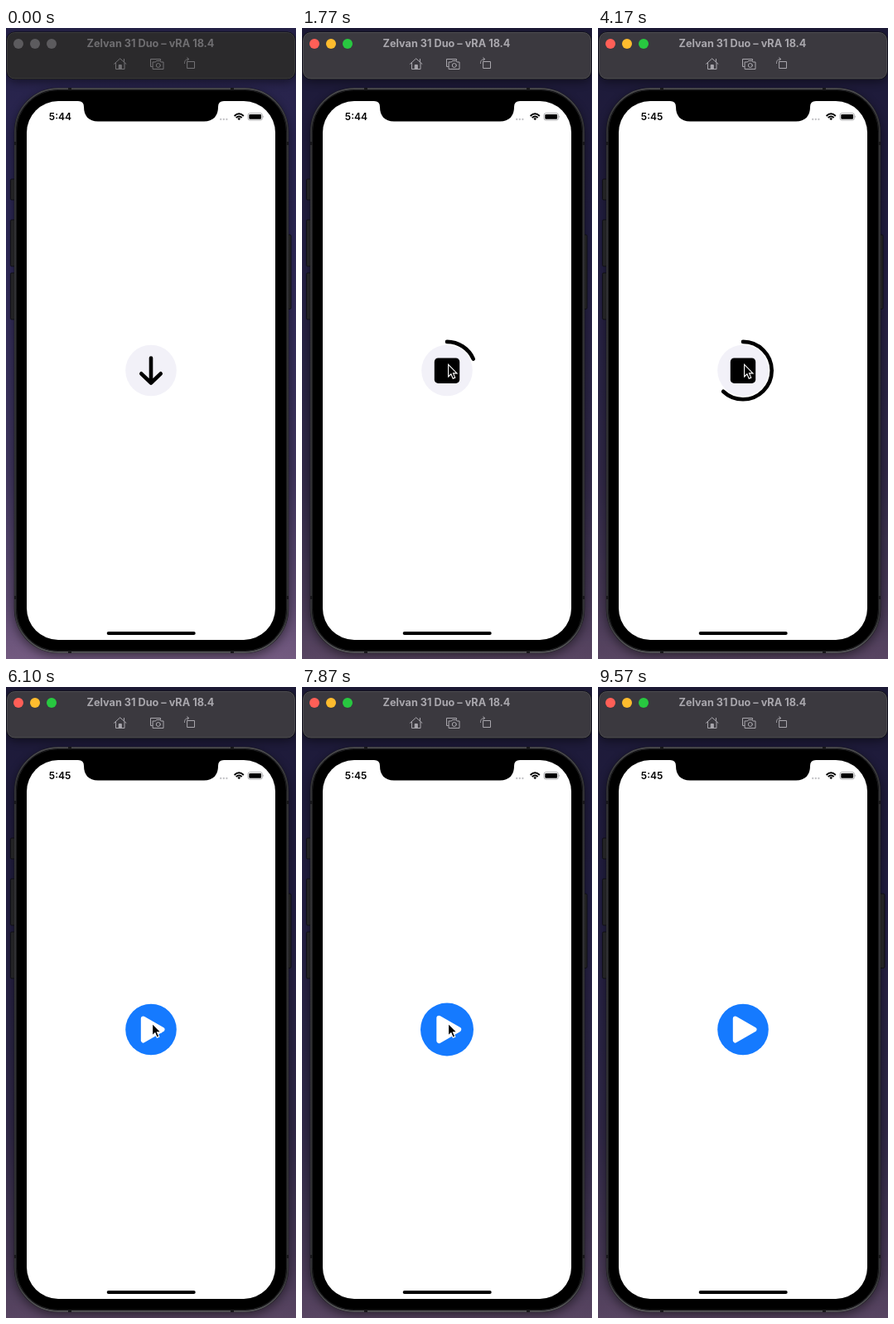
Animation, 350 px wide and 760 px high, one loop 9630 ms. Source, as an HTML page:

```html
<!DOCTYPE html>
<html lang="en">
<head>
<meta charset="utf-8">
<title>Download button</title>
<style>
  html, body { margin: 0; height: 100%; overflow: hidden; background: #2b2650; }
  svg { display: block; width: 100vw; height: 100vh;
    --bar: #2b2a2c; --edge: #454446; --title: #6f6e71; --icon: #727174;
    --red: #5c5b5e; --yellow: #5c5b5e; --green: #5c5b5e; --shade: 0; }
  svg.active { --bar: #3b393f; --edge: #5a585e; --title: #a9a7ad; --icon: #a9a7ad;
    --red: #ff5f57; --yellow: #febc2e; --green: #28c840; --shade: .24; }
  text { font-family: Inter, Roboto, sans-serif; }
  .icons { fill: none; stroke: var(--icon); stroke-linejoin: round; stroke-linecap: round; }
  .round { stroke-linecap: round; stroke-linejoin: round; }
  .keys rect { fill: #232325; stroke: #0b0b0d; stroke-width: .8; }
</style>
</head>
<body>
<svg id="stage" viewBox="0 0 350 760">
  <defs>
    <linearGradient id="sky" x2="0" y2="1">
      <stop offset="0" stop-color="#262248"/>
      <stop offset=".35" stop-color="#2d2857"/>
      <stop offset=".7" stop-color="#40365f"/>
      <stop offset=".9" stop-color="#5c4a70"/>
      <stop offset="1" stop-color="#735a80"/>
    </linearGradient>
    <linearGradient id="rim" x2="0" y2="1">
      <stop offset="0" stop-color="#4c4c4f"/>
      <stop offset=".06" stop-color="#343437"/>
      <stop offset=".94" stop-color="#343437"/>
      <stop offset="1" stop-color="#58585b"/>
    </linearGradient>
    <filter id="blur" x="-20%" y="-20%" width="140%" height="140%">
      <feGaussianBlur stdDeviation="6"/>
    </filter>
  </defs>

  <rect width="350" height="760" fill="url(#sky)"/>
  <rect width="350" height="760" style="opacity: var(--shade)"/>
  <g filter="url(#blur)" opacity=".45">
    <rect x="1" y="9" width="348" height="56" rx="10"/>
    <rect x="9" y="76" width="333" height="681" rx="54"/>
  </g>

  <!-- window bar -->
  <rect x=".5" y="4.5" width="349" height="57.5" rx="10" fill="#09090b"/>
  <rect x="1.5" y="5.5" width="347" height="55.5" rx="9" style="fill: var(--bar); stroke: var(--edge)" stroke-width=".8"/>
  <circle cx="15" cy="19" r="6" style="fill: var(--red)"/>
  <circle cx="35" cy="19" r="6" style="fill: var(--yellow)"/>
  <circle cx="55" cy="19" r="6" style="fill: var(--green)"/>
  <text x="174.5" y="23" text-anchor="middle" font-size="12.7" font-weight="700" style="fill: var(--title)">Zelvan 31 Duo – vRA 18.4</text>
  <g class="icons">
    <path d="M130.5 43.3 137.7 36.8 145 43.3M132.5 42V49.5H143V42M142.5 40.5V37.5"/>
    <path d="M136.2 49V44.5H139.3V49Z" style="fill: var(--icon)"/>
    <path d="M176.5 46.5H174.5V37.5H186.5V39"/>
    <path d="M177.5 41H180.5L181.5 39.5H186L187 41H190V49.5H177.5Z"/>
    <circle cx="183.8" cy="45" r="2.5"/>
    <path d="M219 40.5H227.5V48.5H219ZM215.5 42.5C215.5 39 217 37.5 220.5 37.5M218.8 35.7 220.7 37.5 218.8 39.3"/>
  </g>

  <!-- phone -->
  <g class="keys">
    <rect x="5.4" y="182" width="8" height="25" rx="1.5"/>
    <rect x="5.4" y="231" width="8" height="56" rx="1.5"/>
    <rect x="5.4" y="295" width="8" height="56" rx="1.5"/>
    <rect id="side" x="334" y="249" width="10" height="89.5" rx="1.5"/>
  </g>
  <rect x="9.8" y="72" width="331.4" height="681" rx="53" fill="#111113"/>
  <rect x="11" y="73.2" width="329" height="678.6" rx="52" fill="none" stroke="url(#rim)" stroke-width="1.8"/>
  <rect x="12.6" y="74.8" width="325.8" height="675.4" rx="50" fill="#000" stroke="#1d1d1f"/>
  <path d="M10 139H13M10 686H13M338 139H341M338 686H341M77 72V75M273 72V75M77 750V753M273 750V753" stroke="#18181a" stroke-width="4"/>
  <rect x="25" y="88" width="300" height="649" rx="38" fill="#fff"/>
  <path d="M87 87.5V88Q94 88 94 95C94 106 100 112.5 111 112.5H239C250 112.5 256 106 256 95Q256 88 263 88V87.5Z"/>
  <rect x="121.7" y="727" width="107" height="4" rx="2"/>

  <!-- status line -->
  <text id="clock" x="51.8" y="111.4" font-size="12" font-weight="600">5:44</text>
  <path class="round" d="M259.2 110H270" stroke="#c3c3c6" stroke-width="2.3" stroke-dasharray="0 3.6"/>
  <g fill="none" stroke="#000" stroke-width="1.9">
    <path d="M275.6 106Q281.2 100.6 286.8 106"/>
    <path d="M277.7 108Q281.2 104.8 284.7 108"/>
  </g>
  <path d="M279.3 109.1Q281.2 107.6 283.1 109.1L281.2 111.2Z"/>
  <rect x="292" y="102.6" width="17.4" height="8.4" rx="2.3" fill="none" stroke="#9b9b9d" stroke-width=".8"/>
  <rect x="293.3" y="103.9" width="14.8" height="5.8" rx="1.2"/>
  <path d="M310.3 105.2Q311.8 106.8 310.3 108.4Z" fill="#9b9b9d"/>

  <!-- button, drawn around its centre -->
  <g id="button">
    <circle id="disc" r="30.8"/>
    <path id="arrow" class="round" d="M0-15V15M-11.7 3.8 0 15 11.7 3.8" fill="none" stroke="#000" stroke-width="4.6"/>
    <rect id="stop" x="-15.2" y="-15" width="30.4" height="30.4" rx="4.5"/>
    <path id="play" class="round" d="M-9.2-13 13.5 0-9.2 13Z" fill="#fff" stroke="#fff" stroke-width="6"/>
  </g>
  <circle id="ring" class="round" r="34.7" transform="translate(175 412.6) rotate(-90)" pathLength="100" fill="none" stroke="#000" stroke-width="4.6"/>
  <path id="cursor" d="M0 0V14.6L3.3 11.5 5.6 16.9 8.2 15.8 5.9 10.6H10.4Z" stroke="#fff" stroke-width="1.1"/>
</svg>

<script>
const LOOP = 9630;
const ACTIVE = 300, START = 540, MINUTE = 2970, DONE = 6100;
const TICK = 508, FIRST_TICK = 1032, TICK_TIME = 310;
const $ = id => document.getElementById(id);
const show = (id, on) => $(id).style.display = on ? '' : 'none';
const ease = x => x * x * (3 - 2 * x);

// Eased value at time t along [time, value] points.
function track(points, t) {
  const i = points.findIndex(p => p[0] > t);
  if (i === 0) return points[0][1];
  if (i < 0) return points[points.length - 1][1];
  const [t0, a] = points[i - 1], [t1, b] = points[i];
  return a + (b - a) * ease((t - t0) / (t1 - t0));
}

const press = [
  [340, 0], [520, 1], [560, 1], [800, 0],
  [6680, 0], [6930, 1], [7150, 1], [7400, 0],
  [7580, 0], [7750, 1], [7990, 0], [8180, 1], [8370, 1], [8610, 0]
];
const cursorX = [[70, 352], [330, 176.6], [8560, 176.6], [9010, 352]];
const cursorY = [[70, 318], [330, 405.3], [8560, 405.3], [9010, 318]];
const sideReach = [[8920, 0], [9180, 4.5], [9380, 4.5], [9630, 1.5]];

function progress(t) {
  const n = Math.floor((t - FIRST_TICK) / TICK);
  return n < 0 ? 0 : Math.min(100, 10 * (n + ease(Math.min(1, (t - FIRST_TICK - n * TICK) / TICK_TIME))));
}

function draw(t) {
  const done = t >= DONE, loading = t >= START && !done;
  $('stage').classList.toggle('active', t >= ACTIVE);
  $('clock').textContent = t < MINUTE ? '5:44' : '5:45';

  show('arrow', t < START);
  show('stop', loading);
  show('play', done);
  $('disc').setAttribute('fill', done ? '#157aff' : '#f2f1f8');
  $('button').setAttribute('transform', `translate(175 412.5) scale(${1 + .08 * track(press, t)})`);

  const p = progress(t);
  show('ring', loading && p > 0);
  $('ring').setAttribute('stroke-dasharray', `${p} 200`);

  show('cursor', t >= 70 && t < 9010);
  $('cursor').setAttribute('transform', `translate(${track(cursorX, t)} ${track(cursorY, t)})`);
  $('side').setAttribute('width', 10 + track(sideReach, t));
}

function frame() {
  draw(performance.now() % LOOP);
  requestAnimationFrame(frame);
}
frame();
</script>
</body>
</html>
```
